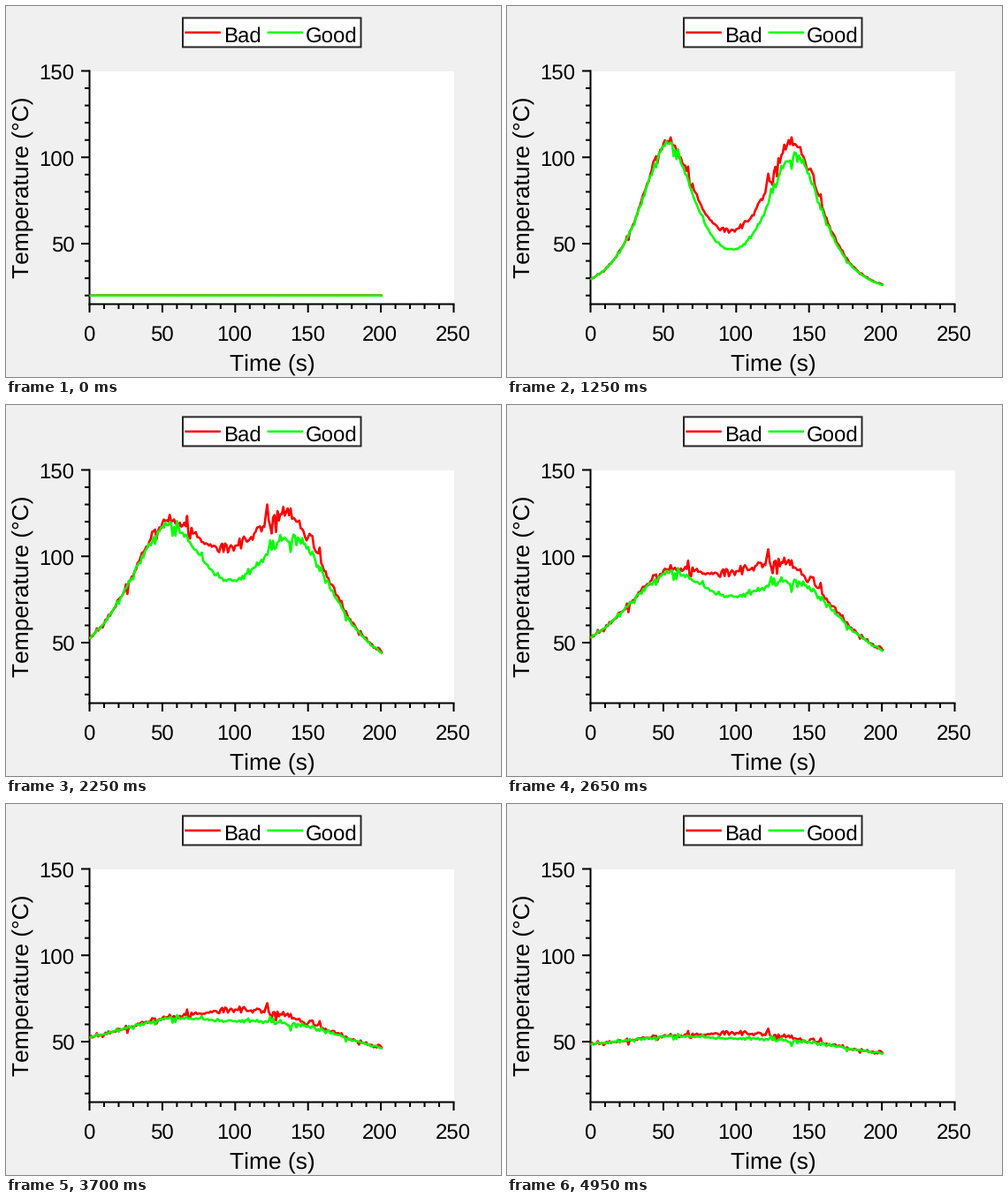
A matplotlib script that plays this animation: 560 by 420 pixels, repeating every 5 s.

```python
import numpy as np
import matplotlib.pyplot as plt
from matplotlib.animation import FuncAnimation
from matplotlib.patches import Rectangle

W, H, DPI = 560, 420, 100
PX = 72 / DPI
FRAMES, STEP = 100, 50
AMBIENT = 20
HEAT_OFF = 1.95  # seconds into the loop
SOURCES = ((53, 1), (140, 0.94))  # position, strength
RED, GREEN = "#ff0000", "#00ff00"

# Plain glyph spacing: no hinting, kerning switched off.
plt.rcParams.update({"font.family": "Liberation Sans", "text.hinting": "none",
                     "text.kerning_factor": 6})

rng = np.random.default_rng(4)
axis_s = np.arange(202)


def to_x(seconds):
    return 94.5 + seconds * 412 / 250


def to_y(temp):
    return 73.5 + (150 - temp) * 264 / 135


def sech_peaks(width):
    return sum(k / np.cosh((axis_s - x0) / width) for x0, k in SOURCES)


def jitter(spread):
    """Fixed heavy-tailed noise along the curve."""
    return np.clip(rng.standard_t(4, len(axis_s)) * spread, -0.1, 0.1)


BAD_NOISE = jitter(0.017)
GOOD_NOISE = jitter(0.007 + 0.014 * sech_peaks(12))


def peak_height(t):
    heated = 124 * (1 - np.exp(-min(t, HEAT_OFF) / 1.1))
    return heated / (1 + 1.88 * max(t - HEAT_OFF, 0) ** 1.6)


def temperatures(t):
    """Bad and good curves, t seconds into the loop."""
    peak = peak_height(t)
    width = min(10 + 3.8 * t + 1.4 * t**2, 44)
    soak = 23 * t**4 / (t**4 + 2.3**4) * (1.05 - axis_s / 1000)
    good = soak + peak * sech_peaks(width)
    excess = peak * min(0.11 * t, 0.35) * np.exp(-((axis_s - 110) / 30) ** 2 / 2)
    bad = good + excess
    return AMBIENT + bad * (1 + BAD_NOISE), AMBIENT + good * (1 + GOOD_NOISE)


fig = plt.figure(figsize=(W / DPI, H / DPI), dpi=DPI, facecolor="#f0f0f0")
ax = fig.add_axes([0, 0, 1, 1])
ax.set(xlim=(0, W), ylim=(H, 0))
ax.axis("off")


def line(xs, ys, color="black", width=2, z=3):
    return ax.plot(xs, ys, color=color, lw=width * PX, zorder=z, snap=False,
                   solid_capstyle="butt", solid_joinstyle="round")[0]


def label(x, y, text, size=24, ha="center", rotation=0):
    ax.text(x, y, text, fontsize=size * PX, ha=ha, va="baseline",
            rotation=rotation, rotation_mode="anchor")


ax.add_patch(Rectangle((94, 74), 413, 264, fc="white", ec="none"))
line([94.5, 94.5], [72.5, 338.5])
line([93.5, 507.5], [337.5, 337.5])

for s in range(0, 251, 10):
    major = s % 50 == 0
    line([to_x(s)] * 2, [337.5, 347 if major else 343])
    if major:
        label(to_x(s) - 1, 379.5, str(s))
for temp in range(20, 151, 10):
    major = temp % 50 == 0
    line([85 if major else 89, 94.5], [to_y(temp)] * 2)
    if major:
        label(77.3, to_y(temp) + 10, str(temp), ha="right")

label(301, 414, "Time (s)", 26.4)
label(27, 205.5, "Temperature (°C)", 26.4, rotation=90)

ax.add_patch(Rectangle((200, 13.5), 201.5, 33, fc="white", ec="#262626",
                       lw=2 * PX, snap=False))
for x, text, color in ((202.3, "Bad", RED), (295.6, "Good", GREEN)):
    line([x, x + 40.5], [30, 30], color, 2.6)
    label(x + 43.3, 40.5, text, ha="left")

curves = [line([], [], RED, 2.6, 4), line([], [], GREEN, 2.6, 5)]


def draw(i):
    for curve, temps in zip(curves, temperatures(i * STEP / 1000)):
        curve.set_data(to_x(axis_s), to_y(temps))
    return curves


anim = FuncAnimation(fig, draw, frames=FRAMES, interval=STEP, repeat=True, repeat_delay=0)
plt.show()
```
